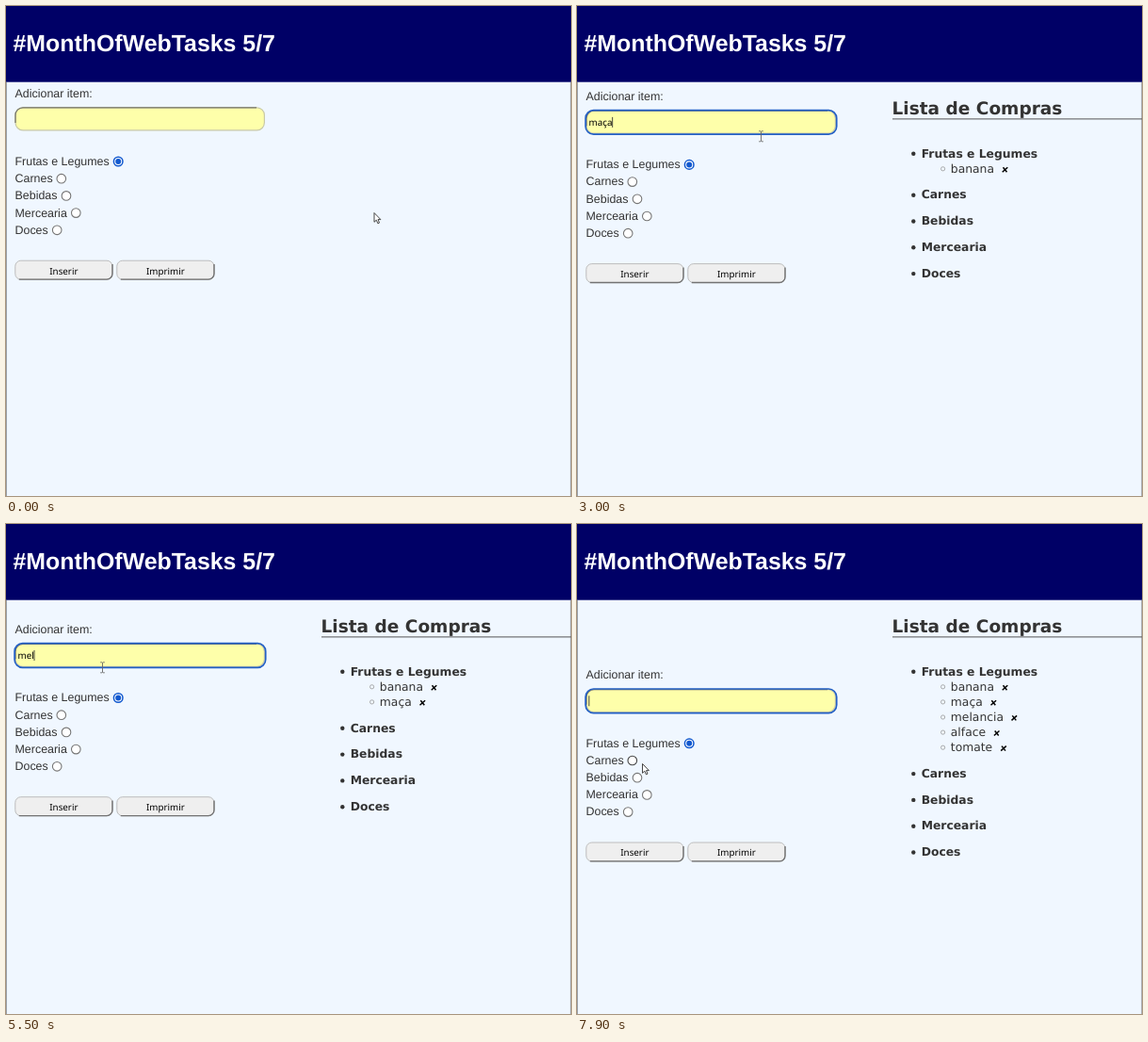
These frames come from a looping animation (600x520 px, 8000 ms). An HTML page:

```html
<!DOCTYPE html>
<html lang="pt">
<head>
<meta charset="utf-8">
<title>Lista de Compras</title>
<style>
  html, body { margin: 0; width: 100%; height: 100%; overflow: hidden; background: #f0f7ff; }
  svg { display: block; }
  text { fill: #333; text-rendering: geometricPrecision; }
  .head { font: bold 24.9px "Liberation Sans", Arial, sans-serif; fill: #fff; }
  .form { font: 12.45px "Liberation Sans", Arial, sans-serif; }
  .ui { font: 9.8px "Noto Sans", "Open Sans", sans-serif; fill: #000; }
  .list { font: 12.35px "DejaVu Sans", Verdana, sans-serif; }
  .bold { font-weight: bold; }
  .title { font-size: 18.55px; }
</style>
</head>
<body>
<svg width="600" height="520" viewBox="0 0 600 520">
  <rect width="600" height="520" fill="#f0f7ff"/>
  <path d="M.5 81V520" stroke="#9aa0a8"/>
  <path d="M599.5 81V520" stroke="#b0b5bc"/>
  <rect width="600" height="80.7" fill="#000066"/>
  <text class="head" x="7.5" y="47.5">#MonthOfWebTasks 5/7</text>

  <g id="form" class="form">
    <text x="9.5" y="96.7">Adicionar item:</text>
    <rect x="10" y="107.8" width="264.4" height="24" rx="8" fill="#feffaa" stroke="#c9c9a6" stroke-width="1.2"/>
    <path d="M10 124V115.8a8 8 0 0 1 8-8H266" fill="none" stroke="#77776b" stroke-width="1.3"/>
    <rect id="ring" x="9.1" y="107.2" width="266.6" height="25.6" rx="8.5" fill="none" stroke="#2460c4" stroke-width="1.7"/>
    <text id="value" class="ui" x="12.6" y="123.8"></text>
    <path id="caret" d="M0 114.5V125.5" stroke="#333" stroke-width=".9"/>
    <g id="radios"></g>
    <g id="buttons"></g>
  </g>

  <g id="list" class="list">
    <text class="bold title" x="334.5" y="115.4">Lista de Compras</text>
    <path d="M335 119.9H600" stroke="#555"/>
    <g id="items"></g>
    <g id="groups"></g>
  </g>

  <path id="arrow" d="M.5 .5V10.3L2.8 8.2L4.4 11.8L6 11.1L4.5 7.6H7.4Z" fill="#fff" stroke="#333" stroke-width=".9"/>
  <path id="beam" d="M-2.3 -5.2H-.6L0 -4.7L.6 -5.2H2.3M0 -4.7V5.3M-2.3 5.8H-.6L0 5.3L.6 5.8H2.3" fill="none" stroke="#666" stroke-width=".9"/>
</svg>
<script>
const $ = id => document.getElementById(id);
const LOOP = 8000, STEP = 100, ROW = 16.1;

const kinds = ["Frutas e Legumes", "Carnes", "Bebidas", "Mercearia", "Doces"];
const radioX = [119.2, 58.8, 64, 74.3, 54.2];

// del: x position of the delete mark
const words = [
  { text: "banana",   start: 900,  pace: 110, enter: 1700, del: 454.5 },
  { text: "maça",     start: 2400, pace: 160, enter: 3400, del: 442.3 },
  { text: "melancia", start: 5300, pace: 100, enter: 6100, del: 464.3 },
  { text: "alface",   start: 6700, pace: 75,  enter: 7200, del: 445.7 },
  { text: "tomate",   start: 7300, pace: 60,  enter: 7700, del: 453 }
];
const FOCUS = 700;

// time, x, y
const mouse = [
  [0, 390.5, 219], [700, 195.5, 133], [1700, 195.5, 133], [2300, 195.5, 138], [3400, 195.5, 138],
  [3700, 100, 152], [4700, 100, 152], [5000, 102.5, 152], [7600, 102.5, 152], [7900, 69, 254], [8000, 69, 254]
];

$("radios").innerHTML = kinds.map((kind, i) => {
  const y = 165 + 18.2 * i;
  return `<text x="9.5" y="${y + 3.9}">${kind}</text>
    <circle cx="${radioX[i]}" cy="${y}" r="4.8" fill="#fff" stroke="${i ? "#767676" : "#1259cf"}" stroke-width="${i ? 1.1 : 1.5}"/>` +
    (i ? "" : `<circle cx="${radioX[i]}" cy="${y}" r="3" fill="#1259cf"/>`);
}).join("");
const carnes = $("radios").querySelectorAll("circle")[2];

$("buttons").innerHTML = [["Inserir", 9.8], ["Imprimir", 117.8]].map(([name, x]) =>
  `<rect x="${x}" y="270.2" width="103.2" height="20" rx="6" fill="#efefef" stroke="#bdbdbd"/>
   <path d="M${x + 4} 290.1h93.2a6 6 0 0 0 6 -6v-10" fill="none" stroke="#737373" stroke-width="1.4"/>
   <text class="ui" x="${x + 51.6}" y="284.5" text-anchor="middle">${name}</text>`).join("");

$("items").innerHTML = words.map((w, i) =>
  `<g transform="translate(0 ${ROW * i})">
    <circle cx="388.6" cy="172.8" r="2.1" fill="none" stroke="#999" stroke-width=".8"/>
    <text x="396.8" y="176.7">${w.text}</text>
    <path d="M${w.del - 2} 171.2L${w.del + 2} 176.2M${w.del + 2.8} 171.2L${w.del - 2.8} 176.2" stroke="#000" stroke-width="1.5"/>
  </g>`).join("");

$("groups").innerHTML = kinds.map((kind, i) =>
  `<g><circle cx="357.3" cy="156.8" r="2.2" fill="#333"/><text class="bold" x="365.7" y="160.5">${kind}</text></g>`).join("");

const move = (el, x, y) => el.setAttribute("transform", `translate(${x} ${y})`);
const show = (el, on) => el.style.display = on ? "" : "none";

function mouseAt(t) {
  const i = mouse.findIndex(k => k[0] > t);
  const [t0, x0, y0] = mouse[i - 1], [t1, x1, y1] = mouse[i];
  const p = (t - t0) / (t1 - t0), e = p * p * (3 - 2 * p);
  return [x0 + (x1 - x0) * e, y0 + (y1 - y0) * e];
}

function draw(t) {
  const count = words.filter(w => w.enter <= t).length;
  const word = words.find(w => w.start <= t && t < w.enter);
  const typed = word ? Math.min(word.text.length, Math.floor((t - word.start) / word.pace) + 1) : 0;
  const lastKey = word ? word.start + (typed - 1) * word.pace
                : count ? words[count - 1].enter : FOCUS;

  move($("form"), 0, count ? 3.4 + ROW * (count - 1) : 0);
  $("value").textContent = word ? word.text.slice(0, typed) : "";
  show($("ring"), t >= FOCUS);
  show($("caret"), t >= FOCUS && (t - lastKey) % 1000 < 500);
  move($("caret"), 12.8 + (typed ? $("value").getComputedTextLength() : 0), 0);

  show($("list"), count);
  [...$("items").children].forEach((el, i) => show(el, i < count));
  [...$("groups").children].forEach((el, i) => move(el, 0, i ? ROW * count + 27.8 * i : 0));

  const [x, y] = mouseAt(t), pointing = t < 600 || t >= 7800;
  move($("arrow"), x, y);
  move($("beam"), x, y);
  show($("arrow"), pointing);
  show($("beam"), !pointing);
  carnes.setAttribute("stroke", t >= 7900 ? "#444" : "#767676");
}

function tick() {
  draw(Math.floor(performance.now() % LOOP / STEP) * STEP);
  requestAnimationFrame(tick);
}
tick();
</script>
</body>
</html>
```
